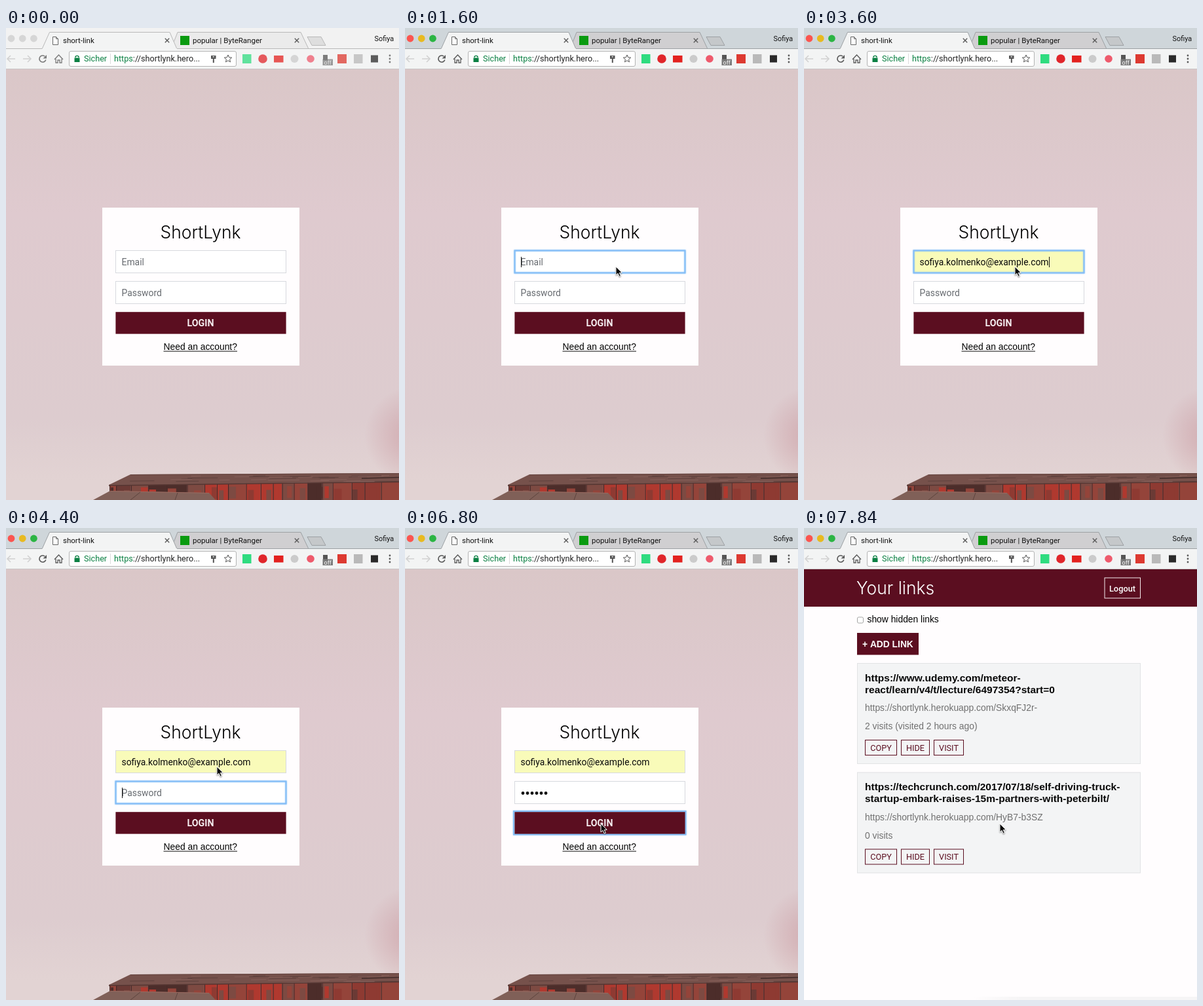
Write an HTML page with a canvas that moves like this. It is 600 px wide and 720 px high and loops after 8 s.

```html
<!DOCTYPE html>
<html lang="en">
<head>
<meta charset="utf-8">
<title>short-link</title>
<style>
html, body { margin: 0; width: 100%; height: 100%; overflow: hidden; }
canvas { display: block; width: 600px; height: 720px; }
</style>
</head>
<body>
<canvas id="stage" width="600" height="720"></canvas>
<script>
const ctx = document.getElementById('stage').getContext('2d');
const LOOP = 8000;
const UI = 'Roboto, "Open Sans", sans-serif';
const BODY = '"Liberation Sans", Arial, sans-serif';
const TITLE = '300 26.4px Inter, Roboto, sans-serif';
const WINE = '#5b0e20';
const EMAIL = 'sofiya.kolmenko@example.com';

const clamp = v => Math.max(0, Math.min(1, v));
const ease = v => v * v * (3 - 2 * v);
const span = (t, a, b) => clamp((t - a) / (b - a));

function hold(t) {
  let k = Math.floor(t / 200);
  const at = n => Math.ceil(n * 2.5) * 80;
  if (at(k) > t) k--;
  return at(k);
}

function text(s, x, y, font, color, align = 'left') {
  ctx.font = font;
  ctx.fillStyle = color;
  ctx.textAlign = align;
  ctx.fillText(s, x, y);
}

function rect(x, y, w, h, color) {
  ctx.fillStyle = color;
  ctx.fillRect(x, y, w, h);
}

function frame(x, y, w, h, color, width = 1) {
  ctx.strokeStyle = color;
  ctx.lineWidth = width;
  ctx.strokeRect(x, y, w, h);
}

function disc(x, y, r, color) {
  ctx.fillStyle = color;
  ctx.beginPath();
  ctx.arc(x, y, r, 0, Math.PI * 2);
  ctx.fill();
}

function trace(points, close) {
  ctx.beginPath();
  points.forEach(([x, y]) => ctx.lineTo(x, y));
  if (close) ctx.closePath();
}

function poly(points, color, stroke) {
  trace(points, true);
  ctx.fillStyle = color;
  ctx.fill();
  if (stroke) {
    ctx.strokeStyle = stroke;
    ctx.lineWidth = 1;
    ctx.stroke();
  }
}

function line(points, color, width = 1.5) {
  trace(points);
  ctx.strokeStyle = color;
  ctx.lineWidth = width;
  ctx.stroke();
}

function cross(x, y) {
  line([[x - 3.2, y - 3.2], [x + 3.2, y + 3.2]], '#5c5c5c', 1.4);
  line([[x + 3.2, y - 3.2], [x - 3.2, y + 3.2]], '#5c5c5c', 1.4);
}

function drawTabs(active) {
  rect(0, 0, 600, 32, active ? '#cfd6da' : '#f2f2f2');
  const lights = active ? ['#fb5550', '#e8ba20', '#2cb544'] : ['#d6d6d6', '#d6d6d6', '#d6d6d6'];
  lights.forEach((c, i) => disc(8 + 17.2 * i, 16, 5.4, c));

  const edge = active ? '#9da1a4' : '#b9b9b9';
  poly([[252, 32], [262, 6.5], [450, 6.5], [462, 32]], active ? '#d0cfd1' : '#ebebeb', edge);
  poly([[460, 13.5], [481, 13.5], [488, 26.5], [467, 26.5]], active ? '#c5c8ca' : '#dedede', edge);
  line([[0, 31.5], [600, 31.5]], edge, 1);
  poly([[55, 32], [66.5, 6.5], [250, 6.5], [261, 32]], '#f3f4f4', edge);
  rect(55.5, 31, 205.5, 2, '#f3f4f4');

  poly([[71.5, 13.5], [76.5, 13.5], [79.5, 16.5], [79.5, 25.5], [71.5, 25.5]], '#fff', '#666');
  line([[76.5, 13.5], [76.5, 16.5], [79.5, 16.5]], '#666', 1);
  text('short-link', 87, 23, '11.5px ' + UI, '#111');
  rect(266, 12, 14, 14, '#0a9b10');
  text('popular | ByteRanger', 285, 23, '11.5px ' + UI, '#111');
  cross(246, 19);
  cross(444, 19);
  text('Sofiya', 562.5, 20, '10.9px ' + UI, '#111');
}

function drawArrow(x, dir) {
  line([[x - 6, 47], [x + 6, 47]], '#d0d0d0');
  line([[x + dir, 42], [x + 6 * dir, 47], [x + dir, 52]], '#d0d0d0');
}

function drawStar(x, y) {
  const pts = [];
  for (let i = 0; i < 10; i++) {
    const a = -Math.PI / 2 + i * Math.PI / 5, r = i % 2 ? 2.7 : 6;
    pts.push([x + r * Math.cos(a), y + r * Math.sin(a)]);
  }
  poly(pts, '#fff', '#555');
}

function drawToolbar(active) {
  rect(0, 32, 600, 31, '#f3f4f4');
  rect(0, 62, 600, 1, '#c9c5c6');
  drawArrow(8, -1);
  drawArrow(32, 1);

  const ink = active ? '#5a5a5a' : '#7b7b7b';
  ctx.beginPath();
  ctx.arc(56, 47, 5, 0.3, 5.4);
  ctx.strokeStyle = ink;
  ctx.lineWidth = 1.6;
  ctx.stroke();
  poly([[62, 41], [62, 46.5], [56.5, 46.5]], ink);
  line([[74, 48], [80.5, 41], [87, 48]], ink, 1.4);
  line([[76, 47], [76, 53], [79, 53], [79, 49], [82, 49], [82, 53], [85, 53], [85, 47]], ink, 1.3);

  ctx.beginPath();
  ctx.roundRect(96.5, 35.5, 255, 23, 2.5);
  ctx.fillStyle = '#fff';
  ctx.fill();
  ctx.strokeStyle = '#b3b3b3';
  ctx.lineWidth = 1;
  ctx.stroke();

  const green = '#0b8043';
  rect(104.5, 45.5, 8, 6.5, green);
  ctx.beginPath();
  ctx.arc(108.5, 45, 2.6, Math.PI, 0);
  ctx.strokeStyle = green;
  ctx.lineWidth = 1.4;
  ctx.stroke();
  const font = '12.65px ' + UI;
  text('Sicher', 119, 51.3, font, green);
  rect(159, 39, 1, 16, '#dcdcdc');
  text('https', 165, 51.3, font, green);
  const w = ctx.measureText('https').width;
  text('://shortlynk.hero...', 165 + w, 51.3, font, '#222');

  rect(313, 42, 7.5, 5, '#555');
  rect(315.8, 46, 2, 7, '#555');
  rect(315.5, 43.3, 2.5, 1.2, '#fff');
  drawStar(339, 47);

  ctx.globalAlpha = active ? 1 : 0.75;
  rect(361, 40, 13.5, 14, '#2fdc80');
  disc(392, 47, 6.8, '#e0262b');
  rect(409, 42, 14.5, 10.5, '#e3221f');
  disc(440.5, 47, 6, '#cbcbcb');
  disc(465, 47, 5.8, '#ee5a6c');
  rect(484, 41, 7, 8, '#555');
  rect(483.5, 47.5, 15.5, 9.5, '#7b7b7b');
  text('off', 491.2, 55.5, '9px ' + UI, '#fff', 'center');
  rect(506, 40, 14, 14, '#dd3a31');
  rect(531, 40, 13.5, 14, '#b9b9b9');
  rect(557, 41.5, 11, 11, '#2a2a2a');
  ctx.globalAlpha = 1;
  [42, 47, 52].forEach(y => disc(586, y, 1.4, ink));
}

function drawTable() {
  let seed = 7;
  const rnd = () => (seed = (seed * 16807) % 2147483647) / 2147483647;
  const pick = list => list[Math.floor(rnd() * list.length)];

  // Front face: planks of uneven width with a lit or dark lower part
  const planks = ['#8e3a32', '#6b3a35', '#b0392f', '#7d4a42', '#4c2d2a', '#94443a'];
  for (let x = 158; x < 600;) {
    const w = 10 + rnd() * 24, y = 696 - (x - 158) * 0.008;
    rect(x, y, w, 720 - y, pick(planks));
    rect(x + w * rnd() * 0.7, y + 3 + rnd() * 8, w * 0.4, 18, pick(planks));
    rect(x, y, 1.2, 720 - y, '#452827');
    x += w;
  }

  // Top face with its grain
  poly([[157, 697], [190, 681], [600, 679], [600, 692], [420, 694], [157, 698]], '#76514b');
  for (let i = 0; i < 30; i++) {
    const x = 188 + rnd() * 380, y = 683 + rnd() * 9;
    line([[x, y], [x + 15 + rnd() * 35, y - 0.5]], i % 2 ? '#87605a' : '#5f413d', 1);
  }
  line([[190, 681.5], [600, 679.5]], '#65443f', 1);
  line([[157, 698], [420, 694.5], [600, 692.5]], '#553632', 1.5);
  line([[543, 687], [600, 685.5]], '#3f2a28', 1.5);

  // Lower step at the left
  poly([[133, 720], [159, 706], [310, 709], [320, 720]], '#806058');
  line([[159, 706.5], [310, 709.5]], '#9a6a60', 1);
  line([[205, 708], [190, 720]], '#5d433e', 1);
  line([[262, 709], [258, 720]], '#5d433e', 1);
}

function drawPhoto() {
  const g = ctx.createLinearGradient(0, 63, 0, 690);
  g.addColorStop(0, '#dac7c8');
  g.addColorStop(0.35, '#dfcacf');
  g.addColorStop(0.85, '#ddcccf');
  g.addColorStop(1, '#e2d3d3');
  rect(0, 63, 600, 657, g);
  const s = ctx.createRadialGradient(622, 622, 5, 622, 622, 75);
  s.addColorStop(0, 'rgba(205,160,166,.75)');
  s.addColorStop(1, 'rgba(205,160,166,0)');
  rect(540, 540, 60, 160, s);
  drawTable();
}

function ring(x, y, w, h) {
  ctx.save();
  ctx.shadowColor = '#7cbcf8';
  ctx.shadowBlur = 2;
  frame(x, y, w, h, '#84bdf6', 2);
  ctx.restore();
}

function caret(x, y) {
  rect(Math.round(x), y, 1, 16, '#111');
}

function field(y, fill, focused) {
  rect(167, y, 261, 35, fill);
  if (focused) ring(167.5, y + 0.5, 260, 34);
  else frame(167.5, y + 0.5, 260, 34, '#d7d9de');
}

function drawLogin(t) {
  drawPhoto();
  rect(147, 274, 301, 241, '#fffdfe');
  text('ShortLynk', 297, 321, TITLE, '#000', 'center');

  const font = '13.9px ' + UI;
  const onEmail = t >= 1600 && t < 3840;
  const onPass = t >= 3840 && t < 6640;
  const typed = EMAIL.slice(0, Math.round(EMAIL.length * span(t, 1680, 3440)));
  field(339, t >= 3600 ? '#f9fbb9' : '#fff', onEmail);
  text(typed || 'Email', 176.5, 361.7, font, typed ? '#0a0a0a' : '#676b70');
  if (onEmail) caret(177 + ctx.measureText(typed).width, 349);

  const dots = t < 4800 ? 0 : t < 5040 ? 1 : t < 5200 ? 2 : t < 5600 ? 4 : 6;
  field(386, '#fff', onPass);
  if (!dots) text('Password', 176.5, 408.7, font, '#676b70');
  for (let i = 0; i < dots; i++) disc(180 + 7 * i, 404.5, 2.4, '#111');
  if (onPass) caret(177 + 7 * dots, 396);

  if (t >= 6640) ring(166, 432, 262.5, 35.5);
  rect(167.4, 433.2, 260.2, 33.4, WINE);
  text('LOGIN', 297, 454.7, '700 14.2px ' + UI, '#f6eef0', 'center');
  text('Need an account?', 240.5, 491, '13.85px ' + BODY, '#000');
  rect(240.5, 492.6, 112.5, 1, '#111');
}

function drawLink(top, heading, code, visits, p) {
  ctx.save();
  ctx.translate(297.5, top + 77);
  ctx.scale(p, p);
  ctx.translate(-297.5, -77);
  ctx.globalAlpha = p;
  rect(81, 0, 433, 154, '#f3f4f5');
  frame(81.5, 0.5, 432, 153, '#e2e3e5');
  heading.forEach((s, i) => text(s, 93, 27.5 + 18 * i, '700 15.5px ' + BODY, '#080808'));
  text('https://shortlynk.herokuapp.com/' + code, 93, 73, '13.85px ' + BODY, '#707070');
  text(visits, 93, 101, '13.85px ' + BODY, '#707070');
  [['COPY', 93, 49], ['HIDE', 148, 44], ['VISIT', 198, 46]].forEach(([s, x, w]) => {
    frame(x + 0.5, 117.5, w - 1, 23, WINE);
    text(s, x + w / 2, 133.6, '12.7px ' + UI, WINE, 'center');
  });
  ctx.restore();
}

function drawLinks(t) {
  rect(0, 63, 600, 657, '#fffdfe');
  const g = ctx.createLinearGradient(260, 0, 330, 0);
  g.addColorStop(0, 'rgba(244,243,244,0)');
  g.addColorStop(1, '#f6f5f6');
  rect(260, 715, 340, 5, g);

  rect(0, 63, 600, 57, WINE);
  text('Your links', 80, 101.3, TITLE, '#fff');
  frame(459, 76, 54.5, 31, '#f4eaec');
  text('Logout', 486, 96.5, '500 12.8px ' + UI, '#fff', 'center');

  ctx.beginPath();
  ctx.roundRect(81.5, 136, 9, 9, 2);
  ctx.fillStyle = '#fff';
  ctx.fill();
  ctx.strokeStyle = '#a5a5a5';
  ctx.lineWidth = 1;
  ctx.stroke();
  text('show hidden links', 96.5, 144, '13.85px ' + BODY, '#000');
  rect(81, 160, 94, 33.5, WINE);
  text('+ ADD LINK', 89, 181.5, '700 13.8px ' + BODY, '#fff');

  if (t < 7200) {
    rect(81, 206, 433, 41, '#f3f4f5');
    frame(81.5, 206.5, 432, 40, '#e2e3e5');
    text('No links found', 297.5, 230.7, 'italic 13.85px ' + BODY, '#666', 'center');
    return;
  }
  const p = ease(span(t, 7080, 7700));
  drawLink(206, ['https://www.udemy.com/meteor-', 'react/learn/v4/t/lecture/6497354?start=0'],
    'SkxqFJ2r-', '2 visits (visited 2 hours ago)', p);
  drawLink(372.5, ['https://techcrunch.com/2017/07/18/self-driving-truck-',
    'startup-embark-raises-15m-partners-with-peterbilt/'], 'HyB7-b3SZ', '0 visits', p);
}

function drawPointer(t) {
  if (t < 240) return;
  let x = 600, y = 190;
  const move = (a, b, tx, ty) => {
    const p = ease(span(t, a, b));
    x += (tx - x) * p;
    y += (ty - y) * p;
  };
  move(160, 1000, 564, 13);
  move(1200, 1600, 322, 364);
  move(5840, 6560, 299, 451);
  ctx.save();
  ctx.translate(x, y);
  ctx.shadowColor = 'rgba(0,0,0,.35)';
  ctx.shadowBlur = 2;
  ctx.shadowOffsetY = 1;
  poly([[0, 0], [0, 13], [3, 10.3], [5.2, 15.2], [7.4, 14.2], [5.3, 9.5], [9.3, 9.3]], '#0a0a0a', '#fff');
  ctx.restore();
}

function draw(t) {
  ctx.textBaseline = 'alphabetic';
  if (t < 7040) drawLogin(t);
  else drawLinks(t);
  const active = t >= 800;
  drawTabs(active);
  drawToolbar(active);
  drawPointer(t);
}

const start = performance.now();
function tick(now) {
  draw(hold(Math.max(0, now - start) % LOOP));
  requestAnimationFrame(tick);
}
draw(0);
requestAnimationFrame(tick);
</script>
</body>
</html>
```
